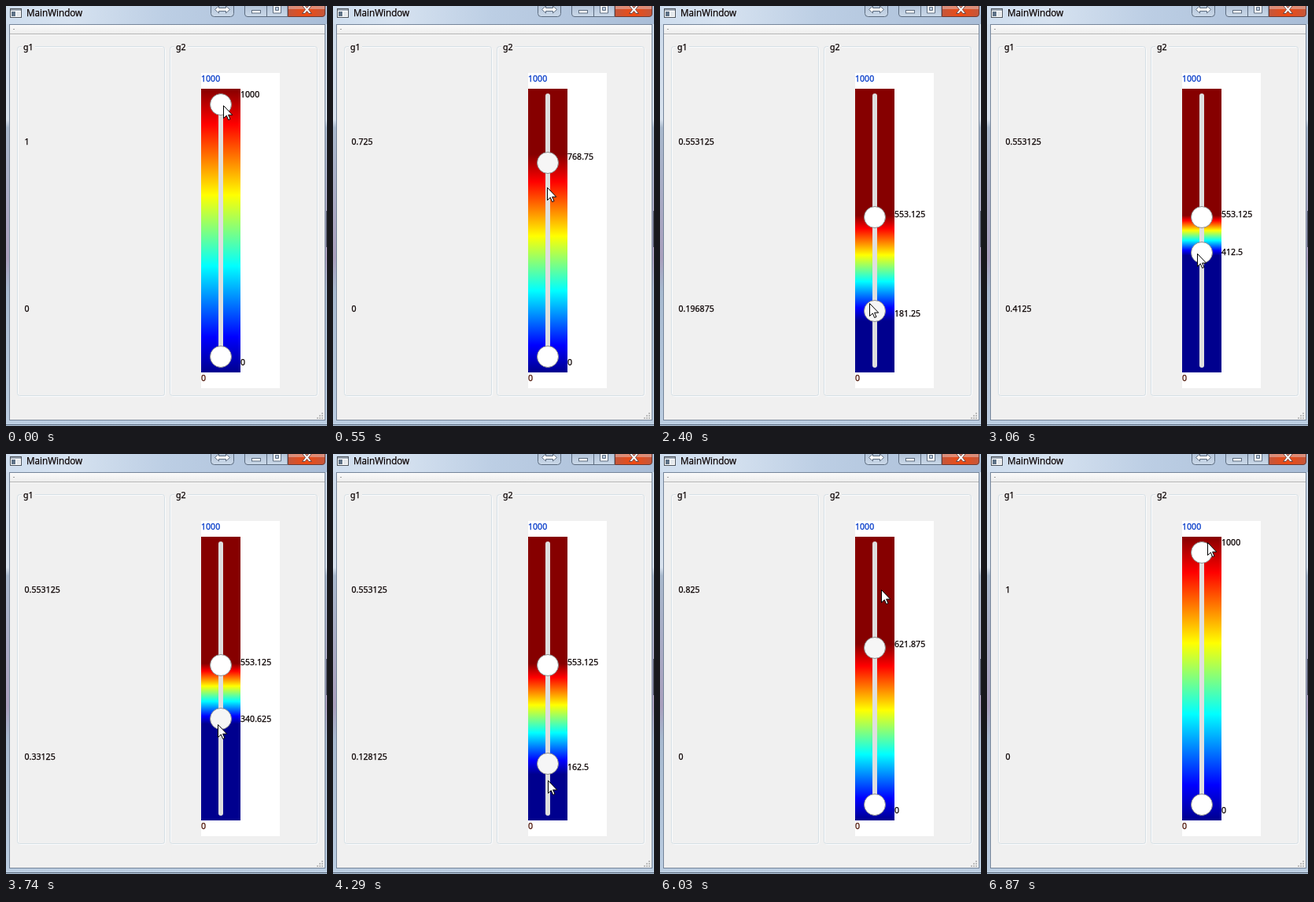
An HTML page for the animation above (6900 ms loop, 408 by 533 pixels).

```html
<!DOCTYPE html>
<html lang="en">
<head>
<meta charset="utf-8">
<title>Range slider</title>
<style>
html, body { margin: 0; width: 100%; height: 100%; overflow: hidden; background: #f0f0f0; }
svg { display: block; width: 408px; height: 533px; }
text { font: 10.6px "Noto Sans", "Open Sans", sans-serif; fill: #0a0000; stroke: #0a0000; stroke-width: .25px; }
.title { font: 11.7px "Open Sans", "Noto Sans", sans-serif; }
.max { fill: #0038c8; stroke: #0038c8; }
.min { fill: #4a1000; stroke: #4a1000; }
.crisp { shape-rendering: crispEdges; }
.group rect { fill: none; stroke: #d5dfe5; }
.group .light { stroke: #fbfcfd; }
.knob { stroke: #8c8c8c; }
</style>
</head>
<body>
<svg viewBox="0 0 408 533">
  <defs>
    <linearGradient id="caption">
      <stop offset="0" stop-color="#cfdeef"/><stop offset=".2" stop-color="#d6e2f0"/>
      <stop offset=".5" stop-color="#bccee4"/><stop offset="1" stop-color="#a9bdd7"/>
    </linearGradient>
    <linearGradient id="edge" x2="0" y2="1">
      <stop offset="0" stop-color="#cbd9ea"/><stop offset=".27" stop-color="#d9e3ef"/>
      <stop offset=".29" stop-color="#a9b9cd"/><stop offset=".6" stop-color="#a99fbd"/>
      <stop offset=".68" stop-color="#a8bad0"/><stop offset="1" stop-color="#bccee2"/>
    </linearGradient>
    <linearGradient id="button" x2="0" y2="1">
      <stop offset="0" stop-color="#a9bbd2"/><stop offset="1" stop-color="#cbd9e9"/>
    </linearGradient>
    <linearGradient id="close">
      <stop offset="0" stop-color="#c4573c"/><stop offset=".5" stop-color="#f04a12"/>
      <stop offset="1" stop-color="#c4573c"/>
    </linearGradient>
    <linearGradient id="tool" x2="0" y2="1">
      <stop offset="0" stop-color="#fafafa"/><stop offset="1" stop-color="#ededed"/>
    </linearGradient>
    <linearGradient id="jet" gradientUnits="userSpaceOnUse" x1="0" x2="0" y1="465" y2="105">
      <stop offset="0" stop-color="#00008e"/><stop offset=".125" stop-color="#00f"/>
      <stop offset=".375" stop-color="#0ff"/><stop offset=".625" stop-color="#ff0"/>
      <stop offset=".875" stop-color="#f00"/><stop offset="1" stop-color="#860000"/>
    </linearGradient>
  </defs>

  <!-- window frame -->
  <rect width="408" height="533" fill="url(#edge)"/>
  <rect width="408" height="23" fill="url(#caption)"/>
  <rect class="crisp" y="531" width="408" height="1" fill="#56667a"/>
  <rect class="crisp" x="407" y="260" width="1" height="46" fill="#3c4655"/>
  <rect class="crisp" x="4.5" y="23.5" width="401" height="502" fill="#f0f0f0" stroke="#75859a"/>
  <g class="crisp">
    <rect x="5.5" y="3.5" width="14" height="11" fill="#fff" stroke="#4d545c"/>
    <rect x="6" y="4" width="13" height="2" fill="#9aa5b2"/>
    <rect x="7" y="7" width="5" height="6" fill="#5d7186"/>
    <rect x="13" y="7" width="5" height="6" fill="#e4e8ec"/>
  </g>
  <text class="title" x="26" y="13">MainWindow</text>

  <!-- caption buttons -->
  <g stroke="#5c6c80">
    <rect x="260.5" y="-6.5" width="29" height="20" rx="4" fill="url(#button)"/>
    <path d="M303.5 -5V10q0 3.5 3.5 3.5H358V-5M331.5 0V13" fill="url(#button)"/>
    <path d="M358.5 -5V13.5H402q3.5 0 3.5 -3.5V-5" fill="url(#close)" stroke="#6b3a34"/>
    <rect x="359" width="46" height="4" fill="#e3b5aa" fill-opacity=".6" stroke="none"/>
    <path d="M265.5 4.5l5 -4.5v2.5h9v-2.5l5 4.5l-5 4.5v-2.5h-9v2.5z" fill="#fff"/>
    <rect x="312.5" y="5.5" width="11" height="3.5" fill="#fff"/>
    <path d="M339.5 -1.5h10v10.5h-10zM342.5 1.5h4v4h-4z" fill="#fff" fill-rule="evenodd"/>
    <path d="M376.5 9.5l4 -5l-4 -5h3.5l2.5 3l2.5 -3h3.5l-4 5l4 5h-3.5l-2.5 -3l-2.5 3z" fill="#fff" stroke="#69484a"/>
  </g>

  <!-- client area -->
  <g class="crisp">
    <rect x="5" y="24" width="400" height="11" fill="url(#tool)"/>
    <rect x="5" y="35" width="400" height="1" fill="#b4b4b4"/>
    <rect x="5" y="36" width="400" height="1" fill="#fafafa"/>
    <rect x="9" y="29" width="2" height="1" fill="#a0a0a0"/>
  </g>
  <g class="group">
    <rect class="light" x="15.5" y="52.5" width="187" height="443" rx="3"/>
    <rect x="14.5" y="51.5" width="187" height="443" rx="3"/>
    <rect class="light" x="209.5" y="52.5" width="187" height="443" rx="3"/>
    <rect x="208.5" y="51.5" width="187" height="443" rx="3"/>
  </g>
  <path d="M20 46h17v12h-17zM214 46h17v12h-17z" fill="#f0f0f0"/>
  <text x="22" y="56">g1</text>
  <text x="216" y="56">g2</text>
  <path class="crisp" d="M401 516h2v2h-2zM398 519h2v2h-2zM401 519h2v2h-2zM395 522h2v2h-2zM398 522h2v2h-2zM401 522h2v2h-2z" fill="#bdbdbd"/>
  <text id="hiText" x="23.5" y="176"></text>
  <text id="loText" x="23.5" y="388"></text>

  <!-- slider -->
  <rect class="crisp" x="248" y="85" width="100" height="400" fill="#fff"/>
  <rect class="crisp" x="248" y="105" width="50" height="360" fill="url(#jet)"/>
  <text class="max" x="248" y="96">1000</text>
  <text class="min" x="248" y="476">0</text>
  <rect x="270" y="111" width="6" height="348" rx="3" fill="#dfdfdf"/>
  <text id="hiTag" x="298"></text>
  <text id="loTag" x="298"></text>
  <circle id="hiKnob" class="knob" cx="273" r="13.5"/>
  <circle id="loKnob" class="knob" cx="273" r="13.5"/>
  <path id="cursor" d="M-.5 -.5V15.5L3.3 12L5.7 17.5L8 16.5L5.6 11.2H10.7z" fill="#fff" stroke="#000"/>
</svg>
<script>
const LOOP = 6900, RANGE = 320;
const $ = id => document.getElementById(id);

// Each drag moves a knob by pixels of travel; the value changes first, the slider repaints late.
const drags = [
  { knob: 'hi', from: 320, to: 177, value: [20, 880], paint: [20, 1045] },
  { knob: 'lo', from: 0, to: 132, value: [1850, 3000], paint: [1900, 3050] },
  { knob: 'lo', from: 132, to: 0, value: [3520, 4638], paint: [3520, 4790] },
  { knob: 'hi', from: 177, to: 320, value: [5450, 6403], paint: [5882, 6840] }
];

// Pointer glides: start, end, then the place reached
const glides = [
  [0, 0, 277, 127], [20, 749, 272, 270], [1440, 1460, 266, 419], [1460, 1700, 266, 447],
  [1850, 2900, 268, 315], [3520, 4536, 276, 447], [4536, 4790, 272, 469],
  [4820, 5220, 274, 270], [5450, 6305, 286, 127], [6305, 6870, 281, 113]
];

const progress = (t, a, b) => t >= b ? 1 : Math.max(0, (t - a) / (b - a));
const mix = (a, b, p) => a + (b - a) * p;
const format = n => String(+n.toPrecision(6));

function travel(knob, phase, t) {
  const own = drags.filter(d => d.knob === knob);
  const d = own.findLast(d => t >= d[phase][0]) || own[0];
  return Math.round(mix(d.from, d.to, progress(t, ...d[phase])));
}

function pointer(t) {
  let x = 0, y = 0;
  for (const [a, b, toX, toY] of glides) {
    const p = progress(t, a, b);
    x = mix(x, toX, p);
    y = mix(y, toY, p);
  }
  return [Math.round(x), Math.round(y)];
}

function setText(el, s) {
  if (el.textContent !== s) el.textContent = s;
}

// Updates one knob with its labels and returns its end of the colour ramp.
function place(knob, t) {
  const px = travel(knob, 'paint', t), part = px / RANGE;
  const held = drags.some(d => d.knob === knob && t >= d.value[0] && t < d.paint[1]);
  setText($(knob + 'Text'), format(travel(knob, 'value', t) / RANGE));
  setText($(knob + 'Tag'), format(part * 1000));
  $(knob + 'Tag').setAttribute('y', Math.round(456 - 340 * part));
  $(knob + 'Knob').setAttribute('cy', 445 - px);
  $(knob + 'Knob').setAttribute('fill', held ? '#f6f6f6' : '#fff');
  return 465 - 360 * part;
}

function draw(t) {
  $('jet').setAttribute('y1', place('lo', t));
  $('jet').setAttribute('y2', place('hi', t));
  $('cursor').setAttribute('transform', `translate(${pointer(t)})`);
}

const start = performance.now();
function tick() {
  draw((performance.now() - start) % LOOP);
  requestAnimationFrame(tick);
}
tick();
</script>
</body>
</html>
```
